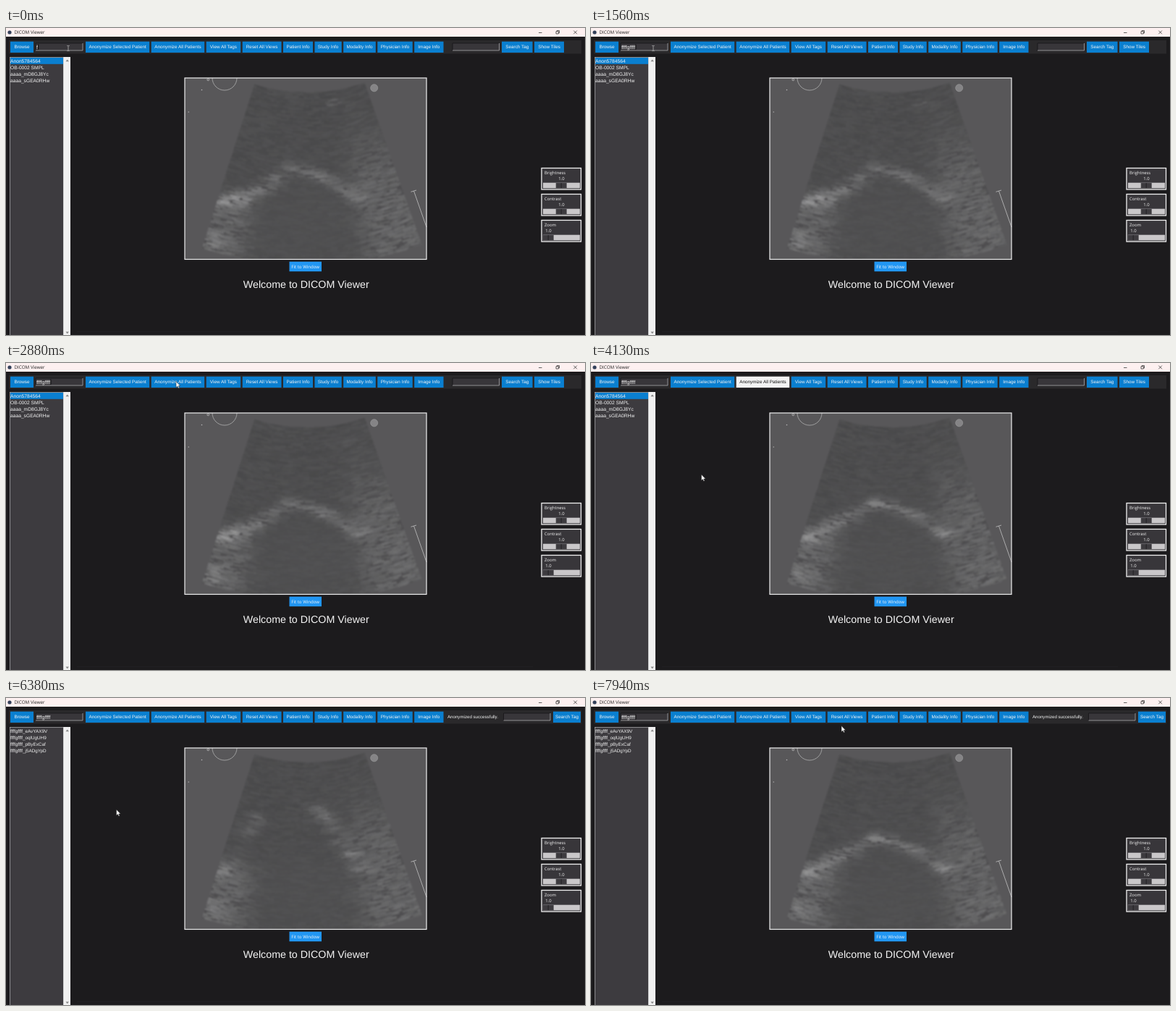
Write an HTML page with a canvas that moves like this. It is 800 by 424 pixels and loops after 8000 ms.

```html
<!DOCTYPE html>
<html lang="en">
<head>
<meta charset="utf-8">
<title>DICOM Viewer</title>
<style>
  html, body { margin: 0; width: 100%; height: 100%; overflow: hidden; background: #1c1b1d; }
  #scan { position: absolute; left: 247px; top: 69px; width: 334px; height: 250px; overflow: hidden; background: #585759; }
  canvas { display: block; filter: blur(.9px); }
  svg { position: absolute; left: 0; top: 0; text-rendering: geometricPrecision; }
  text { font: 6.35px "Liberation Sans", Arial, sans-serif; fill: #f4f4f4; white-space: pre; }
  .ui { font-family: "Open Sans", sans-serif; }
  .mid { text-anchor: middle; }
  .dark { fill: #222; }
</style>
</head>
<body>
<div id="scan"><canvas id="view" width="334" height="251"></canvas></div>
<svg id="ui" width="800" height="424" viewBox="0 0 800 424"></svg>
<script>
const LOOP = 8000, SLOT = 62.5;
const FREEZE = 3062.5, RESUME = 5562.5;   // the viewer hangs while it anonymizes

// ---------- interface ----------
const rect = (x, y, w, h, fill, extra = '') =>
  `<rect x="${x}" y="${y}" width="${w}" height="${h}" fill="${fill}" ${extra}/>`;
const dot = (x, y, r, fill, extra = '') =>
  `<circle cx="${x}" cy="${y}" r="${r}" fill="${fill}" ${extra}/>`;
const label = (x, y, s, size = 6.35, cls = '') =>
  `<text x="${x}" y="${y}" style="font-size:${size}px" class="${cls}">${s}</text>`;
const path = (d, stroke, width = 1, fill = 'none') =>
  `<path d="${d}" stroke="${stroke}" stroke-width="${width}" fill="${fill}"/>`;
const group = (id, content) => `<g id="${id}">${content}</g>`;
const button = (x, x2, s) => rect(x, 18.7, x2 - x, 15.3, '#0a7fd0') +
  label((x + x2) / 2, 28.4, s, 6.35, 'mid');
const entry = (x, w) => rect(x, 21, w, 10, '#38363a') +
  path(`M${x} 31V21H${x + w}`, '#161517', .8) +
  path(`M${x} 31H${x + w}V21`, '#aaa9ab', .8);
const rows = (names, size) => names.map((s, i) => label(6, 48 + i * 8.9, s, size)).join('');

function slider(y, name, knob) {
  return rect(740, y + .5, 54.5, 29.5, '#38363a', 'stroke="#f0f0f0" stroke-width="1.3"') +
    label(744, y + 8.7, name, 5.9, 'ui') +
    label(knob + 7.5, y + 17.3, '1.0', 5.9, 'ui mid') +
    rect(742, y + 20.7, 51, 7.6, '#c9c7c9') +
    rect(knob, y + 20.9, 14.5, 7.2, '#3d3b3f', 'stroke="#5c5a5e" stroke-width=".6"') +
    path(`M${knob + 7.2} ${y + 21}v7`, '#1c1b1d', .8);
}

const titleBar = rect(0, 0, 800, 12, '#fdf0f0') + dot(5, 6, 2.6, '#33405a') +
  label(11.5, 8.4, 'DICOM Viewer', 6.3, 'ui dark') +
  path('M736 6.5h4.5M760 4.7h3.3v3.3h-3.3zM761.2 4.6v-1h3.3v3.4h-1M784.3 3.6l4.6 4.6M788.9 3.6l-4.6 4.6', '#222', .7);

const actions = [[110, 'Anonymize Selected Patient'], [200.7, 'Anonymize All Patients'], [276.7, 'View All Tags'],
  [326.7, 'Reset All Views'], [383, 'Patient Info'], [426.5, 'Study Info'], [466.2, 'Modality Info'],
  [513.3, 'Physician Info'], [564.2, 'Image Info'], [607]];
const toolbar = rect(4, 17, 791, 18.5, '#2a292b') + button(6, 38, 'Browse') + entry(41, 65) +
  actions.slice(0, -1).map(([x, s], i) => group('action' + i, button(x, actions[i + 1][0] - 2.5, s))).join('') +
  group('before', entry(617, 64.5) + button(685, 727.5, 'Search Tag') + button(730, 771, 'Show Tiles')) +
  group('after', label(610, 28.4, 'Anonymized successfully.', 6.15) + entry(687.5, 64.5) + button(756, 794, 'Search Tag')) +
  '<text id="typed" x="42" y="28.5" style="font-size:7.2px"></text>' +
  rect(0, 22.5, .9, 7.5, '#080808', 'id="caret"');

const patients = rect(5.4, 40.4, 74, 390, '#3d3b3f', 'stroke="#b5b4b6" stroke-width=".7"') +
  rect(79.3, 40, 9.7, 384, '#f0f0f0') +
  path('M82.5 46.2l2.2-2.8 2.2 2.8zM82.5 419.5l2.2 2.8 2.2-2.8z', 'none', 0, '#858585') +
  group('oldRows', rect(6, 41, 73, 8.8, '#0a7fd0') +
    rows(['Anon5784564', 'OB-0002 SMPL', 'aaaa_mD8GJ8Yc', 'aaaa_sGEA0RHw'], 6.7)) +
  group('newRows', rows(['eAvYAX9V', 'oqlUgUH9', 'pByExCaf', 'j5ADgYpD'].map(s => 'ffffgffff_' + s), 6.35));

const scanMarks = path('M285 69a17 17 0 0 0 34 0', '#bcbcbc', .7) +
  dot(279.3, 71.3, 1.4, 'none', 'stroke="#ccc" stroke-width=".7"') +
  dot(270.5, 85.5, .8, '#bbb') + dot(252.3, 116, .8, '#aaa') +
  dot(508.7, 82.8, 5, '#858486', 'stroke="#949395" stroke-width=".8"') +
  path('M559.5 226.3l7.5-2.3M563.5 225.2L581 275', '#c2c2c2', .8) +
  rect(247, 69, 334, 250.5, 'none', 'stroke="#efeff0" stroke-width="1.2"');

const pointers =
  group('beam', path('M-1.7-2.5h1.2l.5.5.5-.5h1.2M0-2v6.2M-1.7 4.7h1.2l.5-.5.5.5h1.2', '#c4c4c4', .7)) +
  group('arrow', path('M0 0V8.2L1.9 6.5 3.2 9.3 4.5 8.7 3.3 6H5.8Z', '#222', .5, '#fff'));

const $ = id => document.getElementById(id);
$('ui').innerHTML = titleBar + toolbar + patients + scanMarks +
  slider(193, 'Brightness', 760) + slider(229, 'Contrast', 760) + slider(265, 'Zoom', 742) +
  rect(391.5, 322.7, 44.5, 13.5, '#2196f3') + label(413.7, 331.7, 'Fit to Window', 6.1, 'ui mid') +
  label(414.7, 359.4, 'Welcome to DICOM Viewer', 14.28, 'mid') +
  path('M98 419.5H728', '#232225', .8) + pointers;

const show = (id, on) => $(id).style.display = on ? '' : 'none';
const mix = (a, b, k) => a + (b - a) * k;
const smooth = k => k * k * (3 - 2 * k);
const linear = k => k;

// Interpolates rows of [time, values...]
function track(t, keys, ease) {
  let i = 1;
  while (i < keys.length - 1 && t >= keys[i][0]) i++;
  const a = keys[i - 1], b = keys[i];
  const k = ease(Math.min(1, Math.max(0, (t - a[0]) / (b[0] - a[0]))));
  return a.slice(1).map((v, j) => mix(v, b[j + 1], k));
}

const mouse = [[1750, 86, 27], [2310, 215.3, 19], [2690, 235, 25.5], [3380, 235, 25.5],
  [3940, 152.5, 154], [7125, 152.5, 154], [7940, 346, 38.5]];
const TYPE_STEP = 175, TYPE_END = 8 * TYPE_STEP;

function caretOn(t) {
  const since = t < RESUME ? Math.min(t, FREEZE) - TYPE_END : t - RESUME;
  return since < 0 || since % 900 < 600;
}

function drawUi(t) {
  const done = t >= RESUME, pressed = t >= 2970 && !done;
  show('before', !done); show('after', done);
  show('oldRows', !done); show('newRows', done);
  const [face, caption] = $('action1').children;
  face.setAttribute('fill', pressed ? '#f3f3f3' : '#0a7fd0');
  caption.style.fill = pressed ? '#111' : '';

  const typed = $('typed');
  typed.textContent = 'ffffgffff'.slice(0, 1 + Math.floor(t / TYPE_STEP));
  $('caret').setAttribute('x', 42.2 + typed.getComputedTextLength());
  show('caret', caretOn(t));

  const [x, y] = track(t, mouse, smooth);
  show('beam', x < 107); show('arrow', x >= 107);
  for (const id of ['beam', 'arrow']) $(id).setAttribute('transform', `translate(${x} ${y})`);
}

// ---------- ultrasound ----------
const ctx = $('view').getContext('2d');
const APEX = { x: 416, y: -149 }, NEAR = 238, FAR = 476, LEFT = -.31, RIGHT = .34;
const BEAT = 16;

let seed = 7;
const rnd = () => (seed = seed * 16807 % 2147483647) / 2147483647;
const step = v => 1 / (1 + Math.exp(-v));
const bell = v => Math.exp(-v * v);

// Echo streaks lie along the arcs around the probe; the side walls reflect most
const streaks = Array.from({ length: 4600 }, () => {
  const a = mix(LEFT - .01, RIGHT + .01, rnd());
  const r = Math.sqrt(mix(NEAR ** 2, FAR ** 2, rnd()));
  const x = APEX.x + r * Math.sin(a), y = APEX.y + r * Math.cos(a), len = 3 + rnd() * 5;
  const right = 27 * step((a - .18) / .022) * step((y - 165) / 22);
  const left = 27 * step((-a - .19) / .018) * step((y - 234) / 6);
  const cavity = bell((x - 415) / 80) * bell((y - 272) / 66);
  return {
    x, y, dx: Math.cos(a) * len, dy: -Math.sin(a) * len, cavity,
    w: 1.6 + rnd() * 1.6, level: 78 + right + left + 4 * cavity,
    shift: rnd() * 6.283, turns: 1 + Math.floor(rnd() * 3)
  };
});

// Two leaflets hang between the side walls and their tips; they part at step 11
function echoesAt(p) {
  const open = bell((p - 11) / 1.8), sag = 9 * bell((p - 15) / 2.5);
  const list = [{ x: 285, y: 292, w: 13, h: 11, gain: 18 },
    { x: mix(436, 458, (p - 14) / 2), y: mix(97, 105, (p - 14) / 2), w: 6, h: 2.6, gain: 55 * bell((p - 15) / 1.6) }];
  for (let i = 0; i < 6; i++) {
    const k = i / 5, arc = Math.sin(Math.PI * k), flicker = Math.sin(i * 2.4 + p * Math.PI / 8);
    list.push({
      x: mix(300, mix(392, 344, open), k), y: mix(240, mix(194, 168, open), k) + sag * arc + flicker,
      w: mix(13, 9, k), h: 6, gain: (mix(38, 30, k) + 10 * flicker) * (1 - .95 * open * arc)
    }, {
      x: mix(488, mix(408, 430, open), k), y: mix(236, mix(196, 152, open), k) - 5 * arc,
      w: 9, h: 5, gain: 32 + 12 * flicker
    });
  }
  return list;
}

// Playback position in steps; it rests while the viewer hangs
const playback = [[0, 15.5], [1562.5, 32], [2312.5, 43], [FREEZE, 52]];
const phaseAt = t => t >= RESUME ? 62 + (t - RESUME) / SLOT
  : Math.max(15.5, Math.floor(track(t, playback, linear)[0] + .01));

function sector() {
  const from = Math.PI / 2 - RIGHT, to = Math.PI / 2 - LEFT;
  ctx.beginPath();
  ctx.arc(APEX.x, APEX.y, NEAR, from, to);
  ctx.arc(APEX.x, APEX.y, FAR, to, from, true);
  ctx.closePath();
}

function drawScan(phase) {
  const p = (phase - 4) % BEAT + 4;
  const echoes = echoesAt(p);
  ctx.fillStyle = '#585759';
  ctx.fillRect(0, 0, 334, 251);
  ctx.save();
  ctx.translate(-247, -69);
  sector();
  ctx.clip();
  ctx.fillStyle = '#4e4d4f';
  ctx.fill();
  ctx.globalAlpha = .65;
  for (const s of streaks) {
    let level = s.level;
    for (const e of echoes) {
      const d = ((s.x - e.x) / e.w) ** 2 + ((s.y - e.y) / e.h) ** 2;
      if (d < 9) level += e.gain * Math.exp(-d / 2);
    }
    const grain = 6 * (1 - .6 * s.cavity) + .2 * Math.max(0, level - 85);
    const g = Math.round(level + grain * Math.sin(s.shift + s.turns * p * 2 * Math.PI / BEAT));
    ctx.strokeStyle = `rgb(${g},${g},${g + 1})`;
    ctx.lineWidth = s.w;
    ctx.beginPath();
    ctx.moveTo(s.x - s.dx, s.y - s.dy);
    ctx.lineTo(s.x + s.dx, s.y + s.dy);
    ctx.stroke();
  }
  ctx.restore();
}

// ---------- clock ----------
let lastSlot = -1, lastPhase = -1;
function tick() {
  const slot = Math.floor((performance.now() % LOOP + 5) / SLOT) % (LOOP / SLOT);
  if (slot !== lastSlot) {
    lastSlot = slot;
    const t = slot * SLOT, phase = phaseAt(t);
    drawUi(t);
    if (phase !== lastPhase) drawScan(lastPhase = phase);
  }
  requestAnimationFrame(tick);
}
tick();
</script>
</body>
</html>
```
